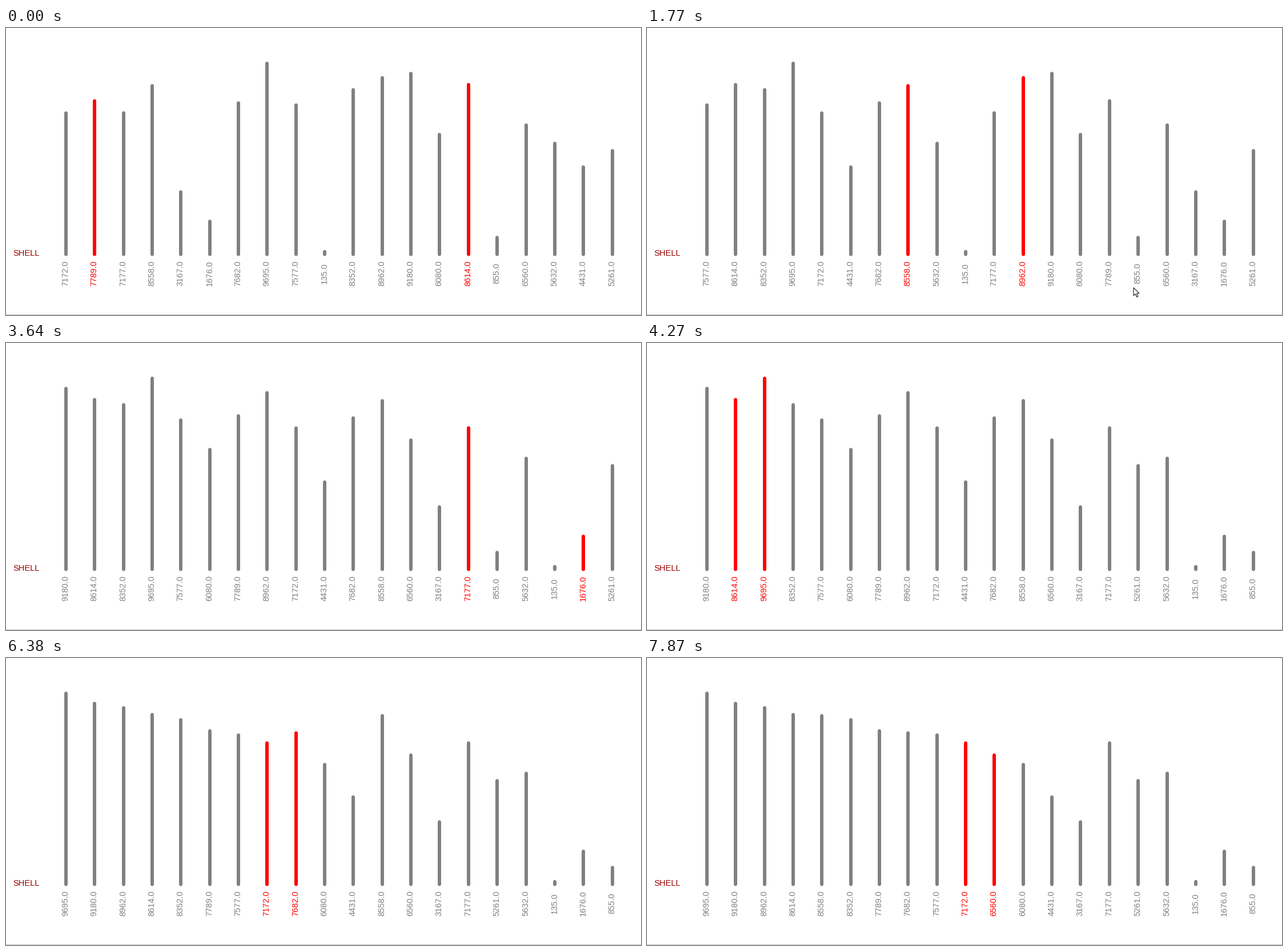
A matplotlib script for the animation above (8 s loop, 1112 px wide and 504 px high).

```python
import math

import matplotlib.pyplot as plt
import numpy as np
from matplotlib.animation import FuncAnimation
from matplotlib.collections import LineCollection
from matplotlib.patches import Polygon

W, H, DPI = 1112, 504, 100
LOOP, STEP = 8000, 20
PX = 72 / DPI
GRAY, RED = "#808080", "#ff0000"
FONT = dict(family="Liberation Sans", size=14.6 * PX, va="baseline")

VALUES = [7172, 7789, 7177, 8558, 3167, 1676, 7682, 9695, 7577, 135,
          8352, 8962, 9180, 6080, 8614, 855, 6560, 5632, 4431, 5261]
N = len(VALUES)
SLOT_X = np.round(104.8 + 50.36 * np.arange(N))
BASE, SCALE, BAR = 397.5, 0.0346, 6

# The screen refreshes in ticks; the sort runs a little slower than that.
TICK, FIRST_TICK = 78.18, 122
TICKS_PER_COMPARE, LEAD = 1.478, 0.23
BLANK_TICK = 72         # canvas cleared during a repaint
POINTER_TICK = 21       # pointer is nearest the labels


def shell_sort(values):
    """Yield (values, pair) at every comparison of a descending shell sort."""
    a = list(values)
    for gap in (13, 4, 1):
        for i in range(gap, N):
            j = i
            while j >= gap:
                yield list(a), (j - gap, j)
                if a[j] <= a[j - gap]:
                    break
                a[j], a[j - gap] = a[j - gap], a[j]
                j -= gap


STATES = list(shell_sort(VALUES))[1:]   # the view opens on the second comparison


def compare_at(tick):
    """Number of the comparison on screen at a tick."""
    return max(0, 1 + math.floor((tick + LEAD) / TICKS_PER_COMPARE))


fig = plt.figure(figsize=(W / DPI, H / DPI), dpi=DPI, facecolor="white")
ax = fig.add_axes([0, 0, 1, 1])
ax.set(xlim=(0, W), ylim=(H, 0))
ax.axis("off")

ax.plot([0, W], [503, 503], color="#c0c0c0", lw=PX)
title = ax.text(12.4, 400, "SHELL", color="#990000", **FONT)
bars = LineCollection([], linewidths=BAR * PX, capstyle="round", snap=False)
ax.add_collection(bars, autolim=False)
labels = [ax.text(x + 3.6, 430.3, "", rotation=90, rotation_mode="anchor",
                  ha="center", **FONT) for x in SLOT_X]
ARROW = np.array([(0, 0), (0, 14), (3.2, 11), (5.6, 16.5), (7.8, 15.5),
                  (5.5, 10.2), (10, 10)])
pointer = Polygon(ARROW, closed=True, fc="white", ec="black", lw=PX, zorder=5)
ax.add_patch(pointer)


def show_state(values, pair):
    colors = [RED if i in pair else GRAY for i in range(N)]
    bars.set_segments([[(x, BASE), (x, BASE - SCALE * v)]
                       for x, v in zip(SLOT_X, values)])
    bars.set_color(colors)
    for label, value, color in zip(labels, values, colors):
        label.set_text(f"{value}.0")
        label.set_color(color)


def update(frame):
    tick = math.floor((frame * STEP + STEP / 2 - FIRST_TICK) / TICK)
    show_state(*STATES[compare_at(tick)])
    for artist in (title, bars, *labels):
        artist.set_visible(tick != BLANK_TICK)

    # the pointer sweeps left, dipping in from the lower edge
    u = tick - POINTER_TICK
    pointer.set_xy(ARROW + (852 - 105 * u, 456 + 30 * u * u))
    pointer.set_visible(abs(u) <= 1)
    return [title, bars, pointer, *labels]


anim = FuncAnimation(fig, update, frames=LOOP // STEP, interval=STEP,
                     repeat=True, repeat_delay=0)
plt.show()
```
